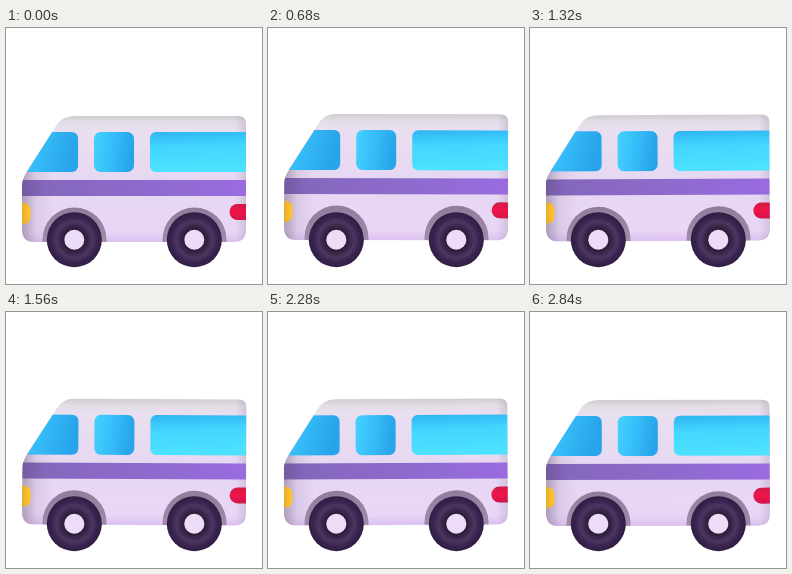
These frames come from a looping animation (256x256 px, 2.88 s). An HTML page:

```html
<!DOCTYPE html>
<html lang="en">
<head>
<meta charset="utf-8">
<title>Minibus</title>
<style>
  html, body { margin: 0; width: 100%; height: 100%; overflow: hidden; background: #fff; }
  svg { display: block; width: 100%; height: 100%; }
</style>
</head>
<body>
<svg viewBox="0 0 256 256">
  <defs>
    <linearGradient id="paint" x2="0" y2="1">
      <stop offset="0" stop-color="#d0cbd1"/>
      <stop offset=".05" stop-color="#e2dde4"/>
      <stop offset=".11" stop-color="#e9dff0"/>
      <stop offset=".5" stop-color="#e6d8f2"/>
      <stop offset=".92" stop-color="#e8d6f6"/>
      <stop offset="1" stop-color="#dcc0f0"/>
    </linearGradient>
    <linearGradient id="sides">
      <stop offset="0" stop-color="#75637f" stop-opacity=".5"/>
      <stop offset=".06" stop-color="#75637f" stop-opacity=".12"/>
      <stop offset=".14" stop-color="#75637f" stop-opacity="0"/>
      <stop offset=".95" stop-color="#9d8aa8" stop-opacity="0"/>
      <stop offset="1" stop-color="#9d8aa8" stop-opacity=".3"/>
    </linearGradient>
    <linearGradient id="glass" x2="1" y2=".15">
      <stop offset="0" stop-color="#45d2ff"/>
      <stop offset=".5" stop-color="#36bdf8"/>
      <stop offset="1" stop-color="#28a4ea"/>
    </linearGradient>
    <linearGradient id="longGlass" x2=".1" y2="1">
      <stop offset="0" stop-color="#2fb4f2"/>
      <stop offset=".4" stop-color="#43d6ff"/>
      <stop offset="1" stop-color="#4ce2ff"/>
    </linearGradient>
    <linearGradient id="stripe">
      <stop offset="0" stop-color="#72599f"/>
      <stop offset=".1" stop-color="#8567bd"/>
      <stop offset=".6" stop-color="#8e6bcf"/>
      <stop offset="1" stop-color="#9a6be0"/>
    </linearGradient>
    <linearGradient id="amber">
      <stop offset="0" stop-color="#d9961c"/>
      <stop offset="1" stop-color="#ffc52f"/>
    </linearGradient>
    <linearGradient id="red" x2="0" y2="1">
      <stop offset="0" stop-color="#cf1b45"/>
      <stop offset=".5" stop-color="#f0144a"/>
      <stop offset="1" stop-color="#d0154a"/>
    </linearGradient>
    <linearGradient id="archShade" x2="0" y2="1">
      <stop offset="0" stop-color="#917c9c"/>
      <stop offset="1" stop-color="#ad98b8"/>
    </linearGradient>
    <radialGradient id="tyre">
      <stop offset=".38" stop-color="#2c1d3b"/>
      <stop offset=".5" stop-color="#392649"/>
      <stop offset=".66" stop-color="#4b3760"/>
      <stop offset=".82" stop-color="#3a2450"/>
      <stop offset="1" stop-color="#301d42"/>
    </radialGradient>
    <path id="shell" d="M68 88H232Q240 88 240 96V202Q240 214 228 214H28Q16 214 16 201V158Q16 151 21 143.500L50 98Q56 88 68 88Z"/>
    <clipPath id="inside"><use href="#shell"/></clipPath>
    <circle id="arch" r="32" fill="url(#archShade)"/>
    <g id="wheel">
      <circle r="27.5" fill="url(#tyre)"/>
      <circle r="10" fill="#eddcf8"/>
    </g>
  </defs>

  <g id="body">
    <use href="#shell" fill="url(#paint)"/>
    <g clip-path="url(#inside)">
      <rect x="16" y="88" width="224" height="126" fill="url(#sides)"/>
      <rect x="0" y="104" width="72" height="40" rx="6" fill="url(#glass)"/>
      <rect x="88" y="104" width="40" height="40" rx="6.500" fill="url(#glass)"/>
      <rect x="144" y="104" width="110" height="40" rx="6" fill="url(#longGlass)"/>
      <rect x="16" y="152" width="224" height="16" fill="url(#stripe)"/>
      <rect x="8" y="175" width="16.500" height="21" rx="7" fill="url(#amber)"/>
      <rect x="223.500" y="176" width="30" height="16" rx="8" fill="url(#red)"/>
      <use href="#arch" x="68.500" y="211.500"/>
      <use href="#arch" x="188.500" y="211.500"/>
    </g>
  </g>

  <use href="#wheel" x="68.300" y="211.700"/>
  <use href="#wheel" x="188.300" y="211.700"/>
</svg>
<script>
  const LOOP = 2880, BOUNCE = 480, STEP = 40;
  const body = document.getElementById('body');

  function draw() {
    const time = Math.floor(performance.now() % LOOP / STEP) * STEP;
    const phase = time / BOUNCE * 2 * Math.PI;
    const lift = Math.cos(phase) - 1;
    const tilt = 0.25 * Math.sin(phase);
    body.setAttribute('transform', `translate(0 ${lift}) rotate(${tilt} 128 212)`);
    requestAnimationFrame(draw);
  }
  draw();
</script>
</body>
</html>
```
